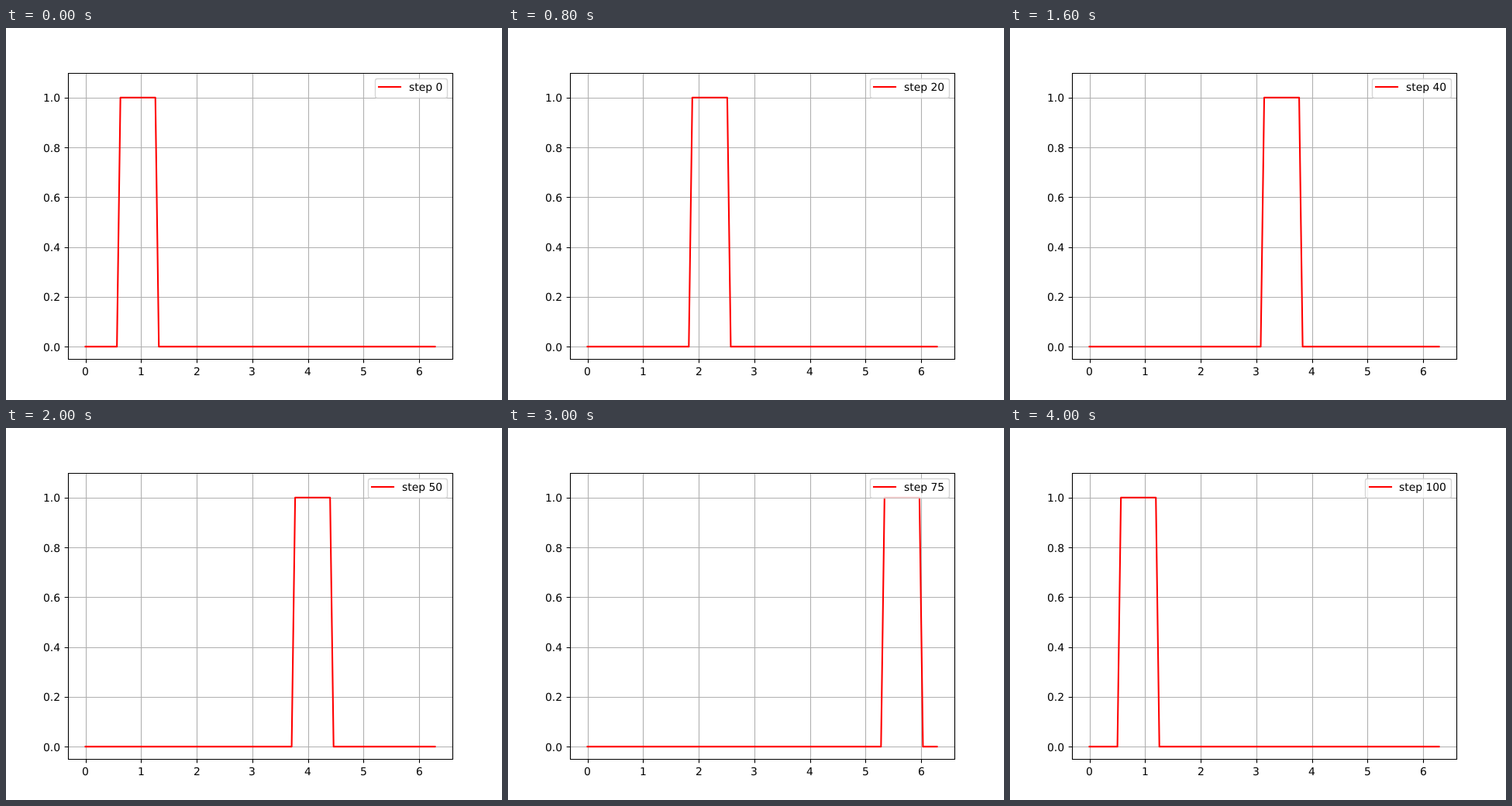
Write an HTML page that moves like this. It is 640 px wide and 480 px high and loops after 4200 ms.

```html
<!DOCTYPE html>
<html lang="en">
<head>
<meta charset="utf-8">
<title>Travelling pulse</title>
<style>
  html, body { margin: 0; width: 100%; height: 100%; overflow: hidden; background: #fff; }
  svg { display: block; width: 640px; height: 480px; }
  text { font: 13.889px "DejaVu Sans", sans-serif; text-rendering: geometricPrecision; white-space: pre; }
  path, polyline { fill: none; }
  .grid { stroke: #b0b0b0; stroke-width: 1.11; }
  .axis { stroke: #000; stroke-width: 1.11; }
  .curve { stroke: #f00; stroke-width: 2.083; stroke-linecap: square; stroke-linejoin: round; }
  .box { fill: #fff; fill-opacity: .8; stroke: #ccc; stroke-opacity: .8; stroke-width: 1.389; }
</style>
</head>
<body>
<svg id="plot" viewBox="0 0 640 480"></svg>
<script>
const FRAME_MS = 200, FRAMES = 21, STEP = 5;
const POINTS = 101, FIRST = 10, LAST = 20;
const AXES = { left: 80, top: 57.6, right: 576, bottom: 427.2 };
const TICK = 4.86;

const plot = document.getElementById('plot');
const width = AXES.right - AXES.left, height = AXES.bottom - AXES.top;
const span = width / 1.1;
const px = x => AXES.left + width * 0.05 / 1.1 + span * x / (2 * Math.PI);
const py = y => AXES.bottom - height * (y + 0.05) / 1.15;
const snap = v => Math.floor(v + 0.5) + 0.5;

function add(tag, attrs, text) {
  const el = document.createElementNS('http://www.w3.org/2000/svg', tag);
  for (const key in attrs) el.setAttribute(key, attrs[key]);
  if (text !== undefined) el.textContent = text;
  return plot.appendChild(el);
}

const left = snap(AXES.left), right = snap(AXES.right);
const top_ = snap(AXES.top), bottom = snap(AXES.bottom);
let grid = '', ticks = '';

for (let i = 0; i <= 6; i++) {
  const x = snap(px(i));
  grid += `M${x} ${top_}V${bottom}`;
  ticks += `M${x} ${bottom}v${TICK}`;
  add('text', { x: Math.round(px(i) - 4.42), y: 448 }, i);
}
for (let i = 0; i <= 5; i++) {
  const v = i / 5, y = snap(py(v));
  grid += `M${left} ${y}H${right}`;
  ticks += `M${left} ${y}h${-TICK}`;
  add('text', { x: 48, y: Math.round(py(v) + 5.5) }, v.toFixed(1));
}

add('path', { class: 'grid', d: grid });
add('path', { class: 'axis', d: ticks });
const curve = add('polyline', { class: 'curve' });
add('path', {
  class: 'axis', 'stroke-linecap': 'square',
  d: `M${left} ${top_}H${right}V${bottom}H${left}Z`
});
const box = add('rect', { class: 'box', y: 65.5, height: 25, rx: 2.78 });
const key = add('path', { class: 'curve' });
const label = add('text', { y: 81 });

function draw(step) {
  const pts = [];
  for (let i = 0; i < POINTS; i++) {
    const j = (i - step + POINTS) % POINTS;
    const v = j >= FIRST && j <= LAST ? 1 : 0;
    pts.push(px(2 * Math.PI * i / (POINTS - 1)).toFixed(3) + ',' + py(v).toFixed(3));
  }
  curve.setAttribute('points', pts.join(' '));

  // The legend grows leftwards with the number of digits.
  const textWidth = 13.889 * (2.481 + 0.636 * String(step).length);
  const start = 519.06 - textWidth, edge = snap(start);
  box.setAttribute('x', edge);
  box.setAttribute('width', 569.5 - edge);
  key.setAttribute('d', `M${Math.round(start + 5.56)} 76h28`);
  label.setAttribute('x', Math.floor(start + 44.44));
  label.textContent = 'step ' + step;
}

let shown = -1;
const begin = performance.now();
function tick() {
  const frame = Math.floor(Math.max(0, performance.now() - begin) / FRAME_MS) % FRAMES;
  if (frame !== shown) draw(STEP * (shown = frame));
  requestAnimationFrame(tick);
}
tick();
</script>
</body>
</html>
```
